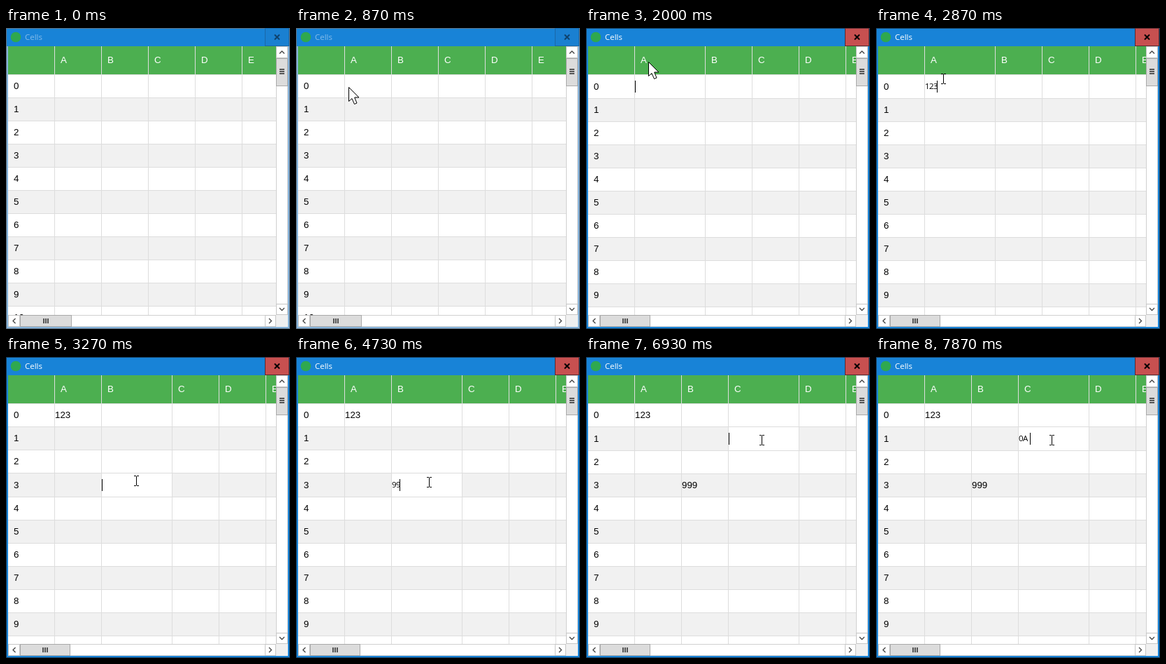
Animation of 406 by 429 pixels, one loop 8 s. Source, as an HTML page with a canvas:

```html
<!DOCTYPE html>
<html lang="en">
<head>
<meta charset="utf-8">
<title>Cells</title>
<style>
  html, body { margin: 0; width: 100%; height: 100%; overflow: hidden; }
  canvas { display: block; }
</style>
</head>
<body>
<canvas id="stage" width="406" height="429"></canvas>
<script>
const ctx = document.getElementById('stage').getContext('2d');
const LOOP = 8000, TICK = 1000 / 15;
const TABLE_FONT = '13.333px "Liberation Sans", Arial, sans-serif';
const UI_FONT = '11.5px "Open Sans", "Noto Sans", sans-serif';
const LINE = '#ddd';
const ACTIVE_AT = 14;

// All times below are in ticks of 1/15 s.
const edits = [
  { at: 15, col: 0, row: 0, keys: [[33, '1'], [38, '123']], off: [[23, 30]] },
  { at: 49, col: 1, row: 3, keys: [[66, '9'], [71, '99'], [73, '999']], off: [[57, 65]] },
  { at: 82, col: 2, row: 1, keys: [[105, '0'], [113, '0A'], [118, '0A ']], off: [[97, 104], [112, 113]] }
];

// Pointer path: tick, x, y
const path = [
  [8, 5, 112], [13, 75, 84], [15, 99, 85], [19, 99, 85], [20, 96, 87], [21, 96, 87],
  [22, 93, 68], [23, 89, 48], [42, 89, 48], [43, 96, 72], [44, 112, 90], [46, 155, 141],
  [49, 186, 176], [51, 190, 178], [76, 190, 178], [78, 206, 161], [80, 234, 131],
  [83, 250, 119], [84, 251, 118], [120, 251, 118]
];

function rect(x, y, w, h, color) {
  ctx.fillStyle = color;
  ctx.fillRect(x, y, w, h);
}

function box(x, y, w, h, fill, edge) {
  rect(x, y, w, h, edge);
  rect(x + 1, y + 1, w - 2, h - 2, fill);
}

function text(str, x, y, color, font) {
  ctx.font = font;
  ctx.fillStyle = color;
  ctx.fillText(str, x, y);
}

function polyline(points, color, width) {
  ctx.beginPath();
  points.forEach(([x, y]) => ctx.lineTo(x, y));
  ctx.strokeStyle = color;
  ctx.lineWidth = width;
  ctx.stroke();
}

function typed(edit, tick) {
  return edit.keys.reduce((str, [at, value]) => tick >= at ? value : str, '');
}

// Top left corner and size of a cell; the edited one grows.
function cellBox(col, row, edit) {
  return {
    x: 70 + 67 * col + (edit && col > edit.col ? 34 : 0),
    y: 67 + 33 * row + (edit && row > edit.row ? 1 : 0),
    w: edit && col === edit.col ? 100 : 66,
    h: edit && row === edit.row ? 33 : 32
  };
}

function drawWindow(active) {
  rect(0, 0, 406, 429, active ? '#173a57' : '#5d6c7a');
  rect(1, 1, 404, 427, active ? '#1883d7' : '#86b4dc');
  rect(1, 1, 404, 25, '#1883d7');
  ctx.fillStyle = '#2fa84f';
  ctx.beginPath();
  ctx.arc(14, 13, 7.3, 0, 7);
  ctx.fill();
  text('Cells', 27, 17, active ? '#fff' : '#83bbe9', UI_FONT);
  box(370, 0, 35, 26, active ? '#c75050' : '#1a80d1', active ? '#5c2b30' : '#1a68a8');
  const ink = active ? '#000' : '#0f426d';
  polyline([[384, 9.5], [391, 16.5]], ink, 2);
  polyline([[391, 9.5], [384, 16.5]], ink, 2);
}

function drawTable(tick, edit) {
  ctx.save();
  ctx.beginPath();
  ctx.rect(3, 26, 383, 383);
  ctx.clip();
  rect(3, 26, 383, 40, '#4caf50');
  rect(3, 66, 383, 1, LINE);
  for (let row = 0; row < 11; row++) {
    const { y, h } = cellBox(0, row, edit);
    rect(3, y, 383, h, row % 2 ? '#f1f1f1' : '#fff');
    rect(3, y + h, 383, 1, LINE);
    text(row, 11, y + h - 12, '#000', TABLE_FONT);
  }
  for (let col = 0; col < 5; col++) {
    const { x } = cellBox(col, 0, edit);
    rect(x - 1, 26, 1, 383, LINE);
    text('ABCDE'[col], x + 8, 50, '#fff', TABLE_FONT);
  }
  for (const done of edits) {
    if (done === edit) break;
    if (!edit) break;
    const { x, y, h } = cellBox(done.col, done.row, edit);
    text(typed(done, tick), x, y + h - 12, '#000', TABLE_FONT);
  }
  if (edit) drawEditor(tick, edit);
  ctx.restore();
}

function drawEditor(tick, edit) {
  const { x, y, w, h } = cellBox(edit.col, edit.row, edit);
  const str = typed(edit, tick);
  rect(x, y, w, h, '#fff');
  ctx.letterSpacing = '-0.57px';
  text(str, x, y + 20, '#000', UI_FONT);
  ctx.letterSpacing = '0px';
  if (edit.off.some(([from, to]) => tick >= from && tick < to)) return;
  const advance = [...str].reduce((sum, c) => sum + ({ A: 8, ' ': 3 }[c] || 6), 0);
  rect(x + Math.max(0, advance - 1), y + 8, 1, 17, '#000');
}

function arrowButton(x, y, w, h, dx, dy) {
  box(x, y, w, h, '#fff', '#c6c6c6');
  const cx = x + w / 2, cy = y + h / 2;
  const wing = s => [cx - dx * 2 + dy * 3.5 * s, cy - dy * 2 + dx * 3.5 * s];
  polyline([wing(-1), [cx + dx * 1.5, cy + dy * 1.5], wing(1)], '#444', 1.3);
}

function drawScrollbars(edit) {
  rect(386, 26, 17, 400, '#f0f0f0');
  box(386, 26, 17, 383, '#fff', '#d0d0d0');
  box(3, 409, 383, 17, '#fff', '#d0d0d0');
  arrowButton(386, 26, 17, 17, 0, -1);
  arrowButton(386, 393, 17, 16, 0, 1);
  arrowButton(3, 409, 17, 17, -1, 0);
  arrowButton(370, 409, 16, 17, 1, 0);
  const width = edit ? 72 : 74;
  box(386, 43, 17, 40, '#dcdcdc', '#a9a9a9');
  box(20, 409, width, 17, '#dcdcdc', '#a9a9a9');
  for (let i = -1; i < 2; i++) {
    rect(391, 61 + 3 * i, 7, 2, '#555');
    rect(19 + width / 2 + 3 * i, 414, 2, 7, '#555');
  }
}

function drawPointer(tick, edit) {
  const next = path.findIndex(p => p[0] > tick);
  if (next < 1) return;
  const [t0, x0, y0] = path[next - 1], [t1, x1, y1] = path[next];
  const k = (tick - t0) / (t1 - t0);
  const x = Math.round(x0 + (x1 - x0) * k), y = Math.round(y0 + (y1 - y0) * k);
  const cell = edit && cellBox(edit.col, edit.row, edit);
  const inside = cell && x >= cell.x && x < cell.x + cell.w && y >= cell.y && y < cell.y + cell.h;
  ctx.save();
  ctx.translate(x, y);
  if (inside) drawBeam(); else drawArrow();
  ctx.restore();
}

function drawBeam() {
  rect(-3, -7, 3, 1, '#000');
  rect(1, -7, 3, 1, '#000');
  rect(0, -6, 1, 13, '#000');
  rect(-3, 7, 3, 1, '#000');
  rect(1, 7, 3, 1, '#000');
}

function drawArrow() {
  ctx.beginPath();
  [[0.5, 0.5], [0.5, 20.5], [5, 16.5], [8.5, 24.5], [12, 23], [8.7, 15], [15, 15]]
    .forEach(([x, y]) => ctx.lineTo(x, y));
  ctx.closePath();
  ctx.fillStyle = '#fff';
  ctx.fill();
  ctx.strokeStyle = '#000';
  ctx.lineWidth = 1;
  ctx.stroke();
}

function draw(ms) {
  const tick = Math.floor((ms % LOOP + 5) / TICK) % 120;
  const edit = edits.filter(e => tick >= e.at).pop();
  drawWindow(tick >= ACTIVE_AT);
  drawTable(tick, edit);
  drawScrollbars(edit);
  drawPointer(tick, edit);
}

const start = performance.now();
function frame() {
  draw(performance.now() - start);
  requestAnimationFrame(frame);
}
frame();
</script>
</body>
</html>
```
